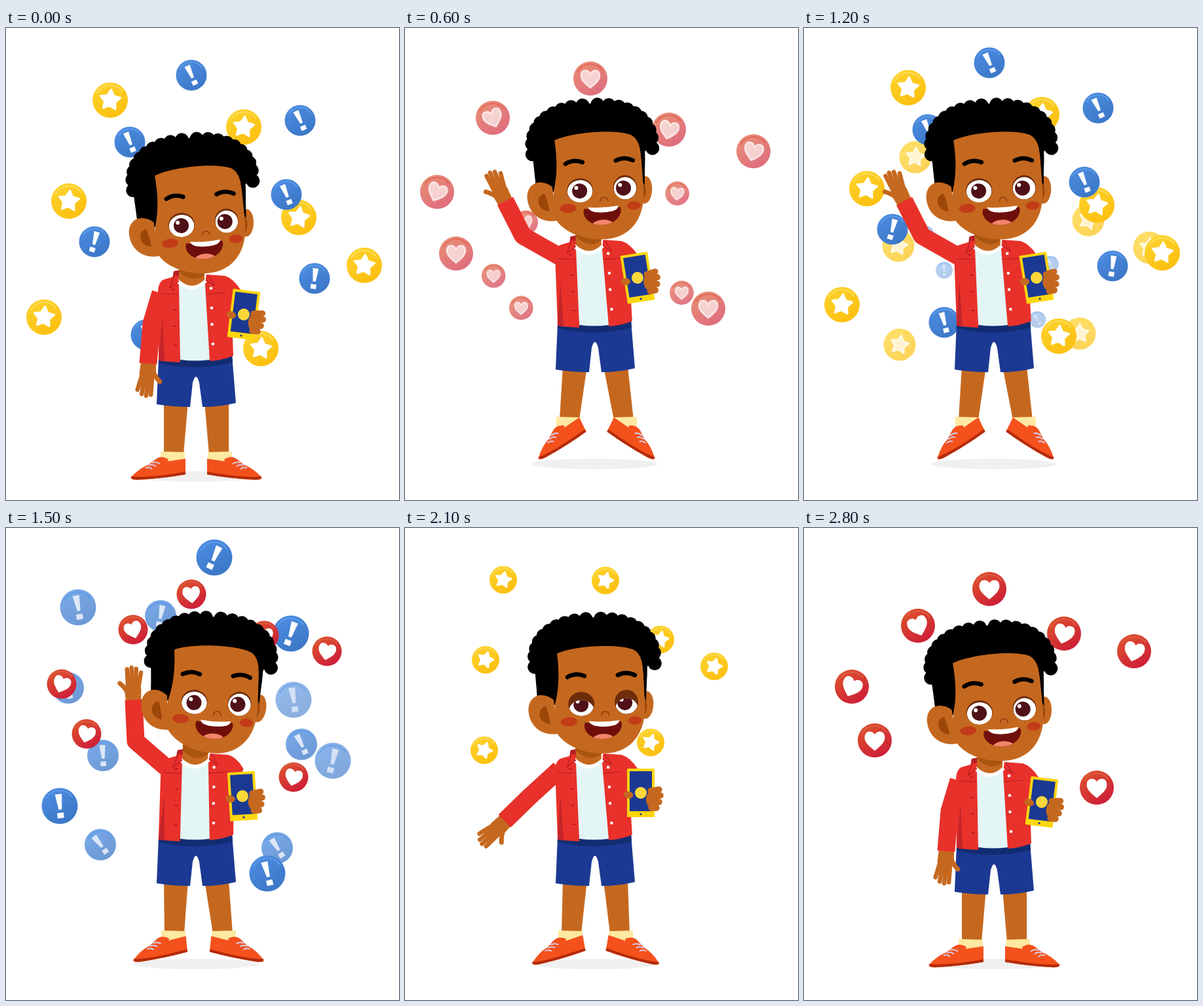
An HTML page with a canvas that plays this animation: 600x720 px, repeating every 3000 ms.

```html
<!DOCTYPE html>
<html lang="en">
<head>
<meta charset="utf-8">
<style>
html, body { margin: 0; width: 100%; height: 100%; overflow: hidden; background: #fff; }
canvas { display: block; }
</style>
</head>
<body>
<canvas id="stage" width="600" height="720"></canvas>
<script>
const ctx = document.getElementById('stage').getContext('2d');
const SKIN = '#c5681f', RED = '#e8312a', DARK_RED = '#b71c22', NAVY = '#1b3993';
const lerp = (a, b, k) => a + (b - a) * k;
const rad = deg => deg * Math.PI / 180;

function fill(color, d) {
  ctx.fillStyle = color;
  ctx.fill(new Path2D(d));
}
function line(color, width, d) {
  ctx.strokeStyle = color;
  ctx.lineWidth = width;
  ctx.stroke(new Path2D(d));
}
function oval(color, x, y, rx, ry = rx, angle = 0) {
  ctx.fillStyle = color;
  ctx.beginPath();
  ctx.ellipse(x, y, rx, ry, angle, 0, 7);
  ctx.fill();
}
function placed(x, y, angle, draw) {
  ctx.save();
  ctx.translate(x, y);
  ctx.rotate(angle);
  draw();
  ctx.restore();
}

// ---- Floating icons, drawn with radius 1 ----
const star = Array.from({ length: 10 }, (_, i) => {
  const a = i * Math.PI / 5 - Math.PI / 2, r = i % 2 ? .32 : .6;
  return `${i ? 'L' : 'M'}${r * Math.cos(a)},${r * Math.sin(a)}`;
}).join('') + 'Z';
const icons = {
  star: { top: '#fdd02a', bottom: '#fcc010', glow: '#fddc55', mark: star },
  note: { top: '#4b8ade', bottom: '#3c78c8', glow: '#5a9ae8',
    mark: 'M-.2,-.66L.18,-.66L.1,.2L-.08,.2ZM-.18,.38L.18,.38L.18,.68L-.18,.68Z' },
  heart: { top: '#dc4d2c', bottom: '#ce2038', glow: '#dc5a45',
    mark: 'M0,.55C-.3,.3 -.58,.08 -.54,-.22C-.5,-.55 -.12,-.55 0,-.24C.12,-.55 .5,-.55 .54,-.22C.58,.08 .3,.3 0,.55Z' }
};

function drawIcon(kind, x, y, r, angle, alpha) {
  const icon = icons[kind];
  ctx.globalAlpha = Math.max(0, Math.min(1, alpha));
  placed(x, y, 0, () => {
    ctx.scale(r, r);
    const shade = ctx.createLinearGradient(-.5, -.8, .5, .8);
    shade.addColorStop(0, icon.top);
    shade.addColorStop(1, icon.bottom);
    oval(shade, 0, 0, 1);
    line(icon.glow, .08, 'M-.76,-.38A.85,.85 0 0 1 .7,-.48');
    ctx.rotate(angle);
    ctx.lineJoin = 'round';
    fill('#fff', icon.mark);
    if (kind !== 'note') line('#fff', .1, icon.mark);
  });
  ctx.globalAlpha = 1;
}

// Waves repeat every 1200 ms; points are x, y, angle and, at the end, opacity.
const waves = [
  { kind: 'star', start: 900, lead: 200, span: 300, end: 320, r: [21, 27],
    from: [[150, 79, .2], [306, 80, .3], [123, 201, .3], [390, 170, .2], [472, 211, .3], [121, 339, .4], [375, 327, .3]],
    to: [[159, 91, .1], [363, 132, .1], [96, 245, .1], [447, 270, .15], [547, 343, .1], [58, 422, .1], [389, 470, .1]] },
  { kind: 'note', start: 0, lead: 250, span: 300, end: 350, r: [23.5, 27.5],
    from: [[283, 53, -.42], [449, 122, -.42], [189, 155, -.38], [428, 235, -.38], [135, 307, .27], [471, 363, .14], [214, 449, -.25]],
    to: [[318, 45, .45], [435, 161, .35], [110, 121, -.17, .75], [439, 262, -.14, .6], [82, 424, -.1], [499, 355, .25, .65], [399, 527, -.25]] },
  { kind: 'heart', start: 300, lead: 250, span: 100, end: 430, r: [22.5, 26],
    from: [[283, 101, -.1], [194, 155, -.3], [394, 164, .1], [490, 188, .2], [85, 238, .35], [123, 314, .25], [439, 380, .25]],
    to: [[283, 93, 0], [174, 149, -.35], [397, 161, .25], [504, 188, .25], [73, 242, .4], [108, 324, 0], [447, 396, 0]] }
];

function drawWave({ kind, start, lead, span, end, r, from, to }, t) {
  const u = (t - start + lead + 1200) % 1200 - lead;
  if (u > end) return;
  const k = u / span, birth = 1 + Math.min(0, u) / lead, grown = Math.max(0, Math.min(1, k));
  from.forEach(([x, y, angle], i) => {
    const [x2, y2, angle2, fade = 1] = to[i];
    const size = lerp(r[0], r[1], grown) * birth;
    const out = Math.max(0, k);
    const alpha = lerp(1, fade, out) * birth * Math.min(1, (end - u) / (kind === 'heart' ? 200 : 20));
    drawIcon(kind, lerp(290, lerp(x, x2, out), birth), lerp(300, lerp(y, y2, out), birth),
      size, lerp(angle, angle2, grown), alpha);
  });
}

// Single bursts leave the body in straight lines; rays are dx, dy, angle.
const bursts = [
  { kind: 'heart', full: 900, rate: .00107, r: 27, alpha: .9, last: 1.19,
    rays: [[-68, -240, .15], [-155, -145, -.3], [-228, -25, 0], [-166, 47, 0], [195, 13, 0], [185, -210, .1]] },
  { kind: 'star', full: 1200, rate: .00155, r: 24.5, alpha: .7, last: 1.2,
    rays: [[-120, -198, .1], [-146, -63, .2], [144, -102, .3], [237, -60, .1], [-144, 88, .2], [131, 71, 0]] },
  { kind: 'note', full: 1500, rate: .00155, r: 24, alpha: .75, last: 1.35,
    rays: [[-54, -261, .2], [-195, -151, -.2], [-142, -48, -.05], [161, -65, -.45], [124, 93, -.55], [-146, 88, -.65]] }
];

function drawBurst({ kind, full, rate, r, alpha, last, rays }, t) {
  const k = 1 + (t - full) * rate;
  if (k <= 0 || k > last) return;
  const size = Math.min(1, k);
  for (const [dx, dy, angle] of rays)
    drawIcon(kind, 290 + dx * k, 395 + dy * k, r * size, angle, alpha * size);
}

// ---- Poses: hip, lean | head x, y, angle | feet left, right, angle | phone x, y, angle | shoulder, elbow, wrist ----
const rest = [0, 0, 300.5, 306, -4.5, 0, 0, 0, 363, 418, 7, 236, 385, 222, 432, 217, 493];
const reach = [-20, -4, 300.5, 286.5, .5, -4, 4, 18, 356, 397, -3, 240, 360, 180, 377, 121, 393];
const wave = [-13, 5, 316.5, 294, 3.2, 1, 6, 5.5, 361, 409, -3.5, 250, 370, 198, 325, 195, 262];
const hop = [-34, -3, 299, 273, -3, -5, 9, 26, 355, 381, -9, 242, 352, 180, 317, 153, 264];
const lower = [-13, -3, 300.5, 294.5, -1.7, -2, 3, 10, 360, 404, 0, 236, 368, 190, 410, 152, 447];
const timeline = [rest, reach, hop, wave, hop, wave, hop, lower, rest, rest, rest];

// Smooth curve through the poses, without overshoot.
function poseAt(t) {
  const i = Math.floor(t / 300), k = t / 300 - i;
  const at = n => timeline[Math.max(0, Math.min(n, timeline.length - 1))];
  const slope = (a, b, c) => (b - a) * (c - b) <= 0 ? 0 : (c - a) / 2;
  return rest.map((_, n) => {
    const [a, b, c, d] = [-1, 0, 1, 2].map(o => at(i + o)[n]);
    const k2 = k * k, k3 = k2 * k;
    return b * (2 * k3 - 3 * k2 + 1) + c * (3 * k2 - 2 * k3)
      + slope(a, b, c) * (k3 - 2 * k2 + k) + slope(b, c, d) * (k3 - k2);
  });
}

function drawShoe() {
  fill('#f4511c', 'M-63,26Q-50,12 -36,7L-26,-1Q-17,-8 -6,-1L-7,2L20,-2L20,22Q-14,28 -50,30Q-66,31 -63,26Z');
  fill('#b42c0a', 'M-63,25Q-40,28 20,18L20,22Q-14,28 -50,30Q-64,31 -63,25Z');
  line('#d3cdea', 2, 'M-41,12Q-35,10 -31,14M-36,8Q-29,6 -25,10M-31,4Q-24,2 -19,6');
}

function drawLeg(side, hip, dx, angle) {
  ctx.save();
  if (side > 0) {
    ctx.translate(581, 0);
    ctx.scale(-1, 1);
    dx = -dx;
  }
  const y = 628 + hip;
  fill(SKIN, `M241,${550 + hip}L278,${550 + hip}L${271 + dx},${y + 4}L${241 + dx},${y + 4}Z`);
  fill('#fde9a2', `M${236 + dx},${y - 1}L${273 + dx},${y}L${273 + dx},${y + 14}L${236 + dx},${y + 14}Z`);
  placed(254 + dx, 640 + hip * 1.04, -rad(angle), drawShoe);
  ctx.restore();
}

function drawShorts() {
  fill(NAVY, 'M233,484L230,555Q255,559 281,559L285,522Q290,504 295,522L300,559Q326,559 351,553L345,480Z');
  fill('#122c72', 'M233,482L345,478L346,491Q290,506 233,492Z');
}

function drawJacket() {
  fill('#e4f5f6', 'M260,366L306,364L312,487Q288,490 266,487Z');
  fill(DARK_RED, 'M256,352L266,350L266,364L254,364Z');
  fill(RED, 'M264,358L240,365Q231,370 232,390L233,488Q250,491 266,491L264,372Z');
  fill(RED, 'M306,357L334,359Q347,363 358,380L345,425L347,481Q330,488 311,489L304,372Z');
  fill('#c2252a', 'M239,420L233,488L242,490Z');
}

function drawJacketDetails() {
  line('#fff', 6, 'M261,366Q283,388 305,366');
  fill(SKIN, 'M264,340L264,365Q284,383 303,365L303,340Z');
  fill('#a9540f', 'M264,340L264,352Q284,372 303,358L303,340Z');
  fill(RED, 'M258,356L250,378L264,367ZM306,357L319,374L305,366Z');
  line(DARK_RED, 1.2, 'M257,359L250,378L264,367M308,358L319,374L305,366M236,386L264,387M305,387L334,385');
  line(DARK_RED, 2, 'M253,380h5M255,411h5M255,436h5M256,465h5');
  for (const [x, y] of [[313, 378], [314, 408], [314.5, 433], [316, 463]]) oval('#fff', x, y, 2.3);
}

function drawArm(sx, sy, ex, ey, wx, wy) {
  ctx.lineCap = 'round';
  placed(wx, wy, Math.atan2(wy - ey, wx - ex), () => {
    fill(SKIN, 'M-4,-12L12,-13Q27,-12 28,0Q26,13 14,12L-4,11Z');
    line(SKIN, 6.5, 'M22,-8L47,-8M24,-2L49,-1M23,4L47,6M18,8L41,13');
    line(SKIN, 7, 'M10,-8Q20,-13 26,-20');
  });
  ctx.lineCap = 'butt';
  ctx.lineJoin = 'round';
  line(RED, 27, `M${sx},${sy}L${ex},${ey}L${wx},${wy}`);
}

function drawEye(x, y, rx, iris, blink) {
  const shape = dy => {
    ctx.beginPath();
    ctx.ellipse(x, y + dy, rx, 17.5, 0, 0, 7);
    ctx.clip();
  };
  oval('#6d2d0b', x, y - 1, rx + .5, 18.5);
  ctx.save();
  shape(0);
  shape(1 + blink * 36);
  oval('#fff', x, y, rx, 17.5);
  oval('#4f1017', iris, y, 11.5);
  oval('#fff', iris - 5, y - 5, 3);
  ctx.restore();
}

function drawHead(blink) {
  ctx.translate(-300.5, -286.5);
  oval(SKIN, 369, 264, 11, 21, .1);
  oval('#9c4708', 366, 267, 4, 11, .1);
  fill('#000', 'M200,195Q200,130 290,128Q384,130 385,190L372,206L369,258L350,200L230,260L203,246Z');
  for (let i = 0; i <= 19; i++) {
    const a = lerp(-.06, Math.PI + .06, i / 19);
    const bend = v => Math.sign(v) * Math.abs(v) ** .85;
    oval('#000', 292 - 92 * bend(Math.cos(a)), 195 - 65 * bend(Math.sin(a)), 10.5);
  }
  fill(SKIN, 'M234,182C258,171 325,168 352,179Q365,186 366,212L367,262C368,305 345,336 304,336C262,336 226,312 226,285L230,258Q239,222 234,182Z');
  fill('#000', 'M202,190L203,246L229,260Q240,228 235,180L220,180Z');
  fill('#000', 'M362,178Q367,205 367,257Q372,230 372,203Z');
  fill(SKIN, 'M228,252C212,238 190,243 189,266C189,290 207,307 232,304Z');
  fill('#9c4708', 'M216,262C203,261 200,287 222,289Q220,274 216,262Z');
  oval('#c23d17', 250.5, 286, 12.5, 7);
  oval('#c23d17', 351, 287, 10.5, 6.5);
  ctx.lineCap = 'round';
  line('#000', 6.5, 'M250,218Q263,211 276,217M327,217Q340,211 353,218');
  drawEye(270, 260.5, 19.5, 269.5, blink);
  drawEye(339, 259.5, 17.5, 336.5, blink);
  line('#8b3d0c', 1.5, 'M300,278Q301,272 306,272Q311,272 312,278');
  const mouth = 'M275,288Q302,292 330,288C334,297 324,314 302,314C280,314 270,298 275,288Z';
  fill('#6f0f0c', mouth);
  ctx.save();
  ctx.clip(new Path2D(mouth));
  oval('#f3846c', 302, 315, 17, 9);
  ctx.restore();
  fill('#fff', 'M281,286Q303,289 327,286Q327,295 304,295Q283,295 281,286Z');
}

function drawPhone() {
  fill('#fdd60c', 'M-20,-37H20Q21,-37 21,-36V36Q21,37 20,37H-20Q-21,37 -21,36V-36Q-21,-37 -20,-37Z');
  fill(NAVY, 'M-17,-33H17V28H-17Z');
  oval(NAVY, 0, 32.5, 1.6);
  oval('#fbd73a', 0, 0, 9);
  oval(SKIN, -19, 3, 7.5, 5.5, .2);
  oval(SKIN, 17, 10, 9, 13);
  ctx.lineCap = 'round';
  line(SKIN, 9.5, 'M15,-3L28,-5M16,6L30,4M16,15L28,14M16,23L24,23');
}

function draw(t) {
  const [hip, lean, hx, hy, ha, left, right, feet, px, py, pa, ...arm] = poseAt(t);
  const blink = Math.max(0, 1 - Math.abs(t - 900) / 150, 1 - Math.abs(t - 2210) / 150);
  ctx.clearRect(0, 0, 600, 720);
  ctx.save();
  ctx.translate(0, t < 100 ? 19 : 0);
  bursts.forEach(b => drawBurst(b, t));
  waves.forEach(w => drawWave(w, t));
  oval('rgba(0,0,0,.06)', 290, 665, 96, 8);
  drawLeg(-1, hip, left, feet);
  drawLeg(1, hip, right, feet);
  placed(0, hip, 0, drawShorts);

  const inTorso = draw => placed(0, hip, 0, () => {
    ctx.transform(1, 0, -lean / 115, 1, lean * 485 / 115, 0);
    draw();
  });
  inTorso(drawJacket);
  drawArm(...arm);
  inTorso(drawJacketDetails);
  placed(hx, hy, rad(ha), () => drawHead(blink));
  placed(px, py, rad(pa), drawPhone);
  ctx.restore();
}

// The animation advances in 100 ms steps and holds the last one.
function tick() {
  draw(Math.min(2800, Math.floor(performance.now() % 3000 / 100) * 100));
  requestAnimationFrame(tick);
}
tick();
</script>
</body>
</html>
```
